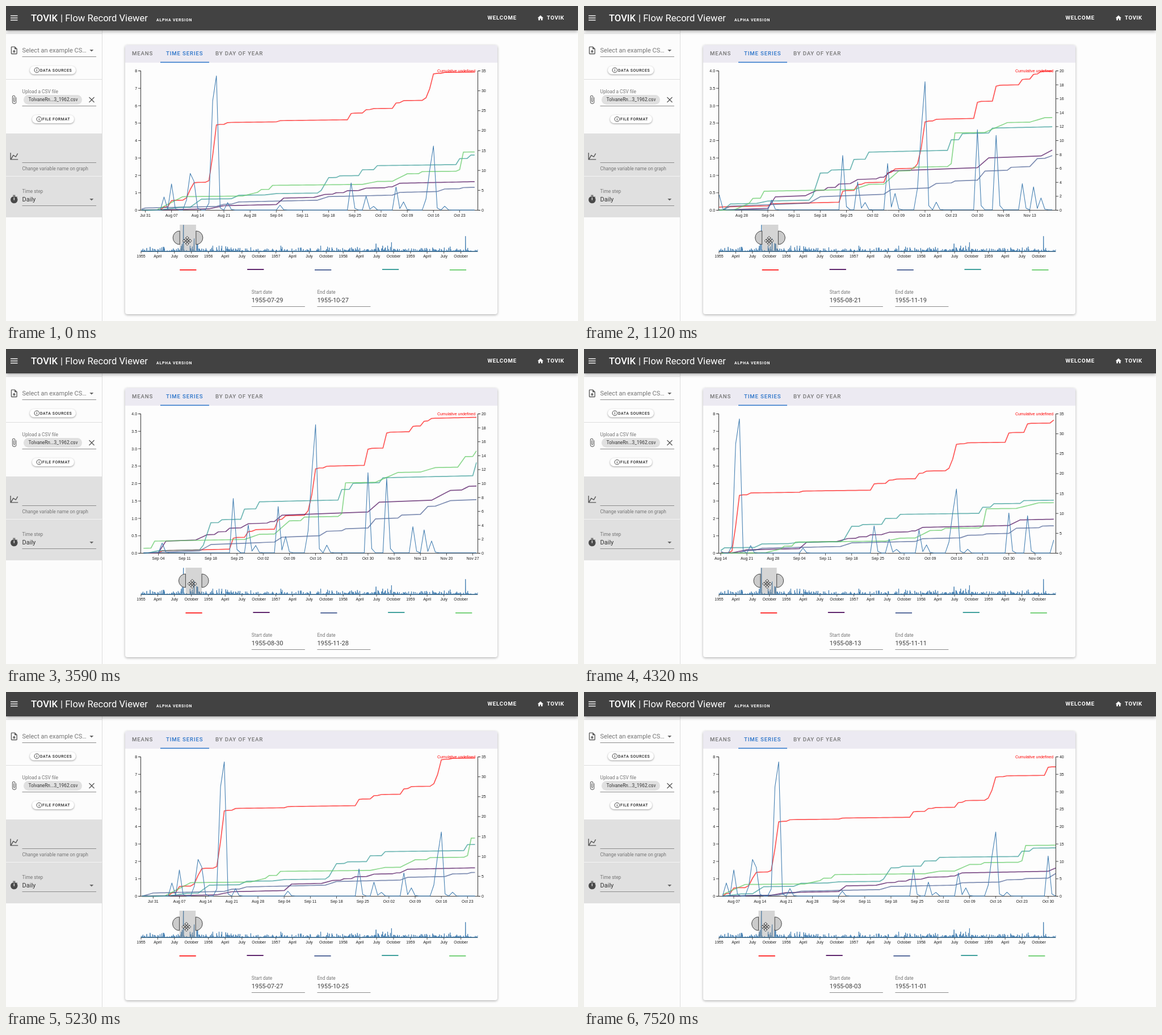
These frames come from a looping animation (1008 by 556 pixels, 8000 ms). An HTML page with a canvas:

```html
<!DOCTYPE html>
<html lang="en">
<head>
<meta charset="utf-8">
<title>Rainfall chart</title>
<style>
html, body { margin: 0; width: 100%; height: 100%; overflow: hidden; background: #fdfdfd; }
canvas { display: block; width: 1008px; height: 556px; }
</style>
</head>
<body>
<canvas id="stage"></canvas>
<script>
const W = 1008, H = 556, LOOP = 8000;
const canvas = document.getElementById('stage');
const ctx = canvas.getContext('2d');
const dpr = window.devicePixelRatio || 1;
canvas.width = W * dpr;
canvas.height = H * dpr;

const ROBOTO = 'Roboto, sans-serif';
const ARIAL = '"Liberation Sans", Arial, sans-serif';
const GREY = '#757575', DARK = '#3c3c3c', BLUE = '#3f7cb0';
const MONTHS = ['Jan', 'Feb', 'Mar', 'Apr', 'May', 'Jun', 'Jul', 'Aug', 'Sep', 'Oct', 'Nov', 'Dec'];

// Plot geometry; day 0 is 31 July 1955.
const LEFT = 238, RIGHT = 831.5, TOP = 114.5, BASE = 360.5;
const SPAN = 90, PX = (RIGHT - LEFT) / SPAN;
const FIRST = -1.14, STRIDE = 2.1;
const MINI = (RIGHT - LEFT) / 1826, MINI_BASE = 433, JUL31 = 211;

// Storms by day; a little rain lingers the day after each.
const storms = new Map([
  [5, .75], [7, 1.5], [11, .57], [12, 2.1], [13, 1.65], [17, .4], [18, 6.27], [19, 7.7], [22, .43], [36, .28],
  [55, 1.56], [59, .8], [61, .21], [67, 1.33], [69, .47], [75, .63], [76, 2.3], [77, 3.68], [80, .22],
  [91, 2.3], [96, 2.14], [103, .75], [106, .66], [108, .34]
]);
const rainOn = day => .012 + (storms.get(day) ?? Math.min(.12, .06 * (storms.get(day - 1) || 0)));

// A slow creep plus rises given as first day, amount, number of days.
const steps = (creep, rises) => day => rises.reduce(
  (sum, [first, amount, days]) => sum + (day >= first && day < first + days ? amount / days : 0),
  day >= 0 ? creep : 0);

const series = [
  { on: rainOn, color: '#ff1010', alpha: .7 },
  { on: steps(.02, [[18, .7, 4], [36, 1.6, 2], [46, .7, 3], [51, .35, 1], [54, .45, 1], [58, .55, 2],
    [65, .2, 1], [67, .85, 2], [92, 1.35, 3], [109, 1.3, 5], [117, .5, 2]]), color: '#440154', alpha: .68 },
  { on: steps(.021, [[-2, .8, 3], [20, .5, 2], [24, .5, 2], [47, .85, 3], [67, .65, 2], [79, .6, 2],
    [85, .25, 1], [92, 1.25, 2], [100, .4, 1], [106, 1.1, 2], [110, .7, 4]]), color: '#3b528b', alpha: .65 },
  { on: steps(.012, [[5, .6, 5], [13, 2, 3], [24, .85, 2], [33, .3, 3], [47, .65, 1], [48, 3.2, 2], [52, .4, 1],
    [58, 1.45, 1], [62, 1, 1], [84, 1.5, 1], [87, .85, 1], [95, .7, 1], [120, 1.9, 1]]), color: '#21918c', alpha: .65 },
  { on: steps(.01, [[4, 3.3, 7], [27, .9, 4], [31, .7, 1], [34, 1, 1], [59, .7, 4], [67, 1.85, 4], [74, .5, 1],
    [84, .4, 1], [85, 4.4, 1], [94, 1.35, 6], [106, .6, 4], [116, 1.5, 2], [120, .8, 1]]), color: '#5ec962', alpha: .7 }
];

// Five years of rain for the overview strip.
const years = (() => {
  let seed = 41;
  const rand = () => (seed = seed * 16807 % 2147483647) / 2147483647;
  const peaks = new Map([[1274, 2.2], [1358, 2.6], [1759, 4.4]]);
  return Array.from({ length: 1826 }, (_, i) => {
    const wet = rand() < .3, amount = Math.min(1.6, -Math.log(rand() + .001) * .36);
    const day = i - JUL31;
    if (day >= 0 && day <= 110) return rainOn(day);
    return peaks.get(i) || (wet ? amount : 0);
  });
})();

// Drag phases: start, end, steps, final position.
const phases = [
  [-24, 290, 6, 3], [510, 750, 5, 7], [810, 1290, 9, 13], [1340, 1390, 2, 14], [1680, 1770, 2, 15],
  [3590, 4370, 15, 6], [4410, 5110, 11, 0], [5230, 5230, 1, -1],
  [6880, 6940, 2, 0], [7130, 7190, 2, 1], [7430, 7520, 2, 2]
];

// The pointer runs one step ahead of the chart while dragging.
function dragAt(t) {
  const k = phases.filter(p => p[0] <= t).length - 1;
  const [t0, t1, count, to] = phases[k];
  const from = k ? phases[k - 1][3] : 0;
  const gap = (t1 - t0) / (count - 1 || 1) || 1;
  const at = i => from + Math.trunc((to - from) * Math.min(i + 1, count) / count);
  const i = Math.floor((t - t0) / gap + 1e-6);
  return { chart: at(i), pointer: at(i + 1) };
}

function text(str, x, y, size, color, o = {}) {
  ctx.font = `${o.weight || 400} ${size}px ${o.font || ROBOTO}`;
  ctx.letterSpacing = (o.gap || 0) + 'px';
  ctx.textAlign = o.align || 'left';
  ctx.fillStyle = color;
  ctx.fillText(str, x, y + size * .36);
  return x + ctx.measureText(str).width;
}
function rect(x, y, w, h, color) {
  ctx.fillStyle = color;
  ctx.fillRect(x, y, w, h);
}
function line(points, color, width) {
  ctx.beginPath();
  points.forEach(([x, y]) => ctx.lineTo(x, y));
  ctx.strokeStyle = color;
  ctx.lineWidth = width;
  ctx.stroke();
}
function panel(x, y, w, h, r, color, shadow) {
  ctx.save();
  if (shadow) {
    ctx.shadowColor = `rgba(0,0,0,${shadow[0]})`;
    ctx.shadowBlur = shadow[1] * dpr;
    ctx.shadowOffsetY = shadow[2] * dpr;
  }
  ctx.beginPath();
  ctx.roundRect(x, y, w, h, r);
  ctx.fillStyle = color;
  ctx.fill();
  ctx.restore();
}
function icon(path, x, y, size, color) {
  ctx.save();
  ctx.translate(x, y);
  ctx.scale(size / 24, size / 24);
  ctx.fillStyle = color;
  ctx.fill(path);
  ctx.restore();
}

const icons = {
  home: new Path2D('M10 20V14H14V20H19V12H22L12 3L2 12H5V20Z'),
  upload: new Path2D('M14 2L20 8V20A2 2 0 0 1 18 22H6A2 2 0 0 1 4 20V4A2 2 0 0 1 6 2H14M18 20V9H13V4H6V20H18M12 11L16 15H13.5V18H10.5V15H8Z'),
  clip: new Path2D('M16.5 6V17.5A4 4 0 0 1 8.5 17.5V5A2.5 2.5 0 0 1 13.5 5V15.5A1 1 0 0 1 11.5 15.5V6H10V15.5A2.5 2.5 0 0 0 15 15.5V5A4 4 0 0 0 7 5V17.5A5.5 5.5 0 0 0 18 17.5V6Z'),
  chart: new Path2D('M16 11.8L20.2 4.5L22 5.5L16.7 14.5L10.2 10.8L5.5 19H22V21H2V3H4V17.5L9.5 8Z'),
  watch: new Path2D('M15 3H9V1H15V3M19 7.4A9 9 0 1 1 17.6 6L19 4.6L20.4 6L19 7.4M13 14V7H11V14Z'),
  caret: new Path2D('M7 10L12 15L17 10Z')
};

function header() {
  panel(0, -4, W, 47, 0, '#424242', [.35, 6, 2]);
  for (let i = 0; i < 3; i++) rect(8, 16.6 + i * 3.8, 12.5, 1.4, '#fff');
  const end = text('TOVIK', 44, 21, 16.6, '#fff', { weight: 500 });
  text('| Flow Record Viewer', end + 5, 21, 16.6, '#fff');
  text('ALPHA VERSION', 265, 24.5, 6.9, '#fff', { weight: 700, gap: .8 });
  text('WELCOME', 848.5, 21, 9.7, '#fff', { weight: 700, gap: .8 });
  icon(icons.home, 935.7, 15, 12.4, '#fff');
  text('TOVIK', 953, 21, 9.7, '#fff', { weight: 700, gap: .6 });
}

function pill(label, x, y, w) {
  panel(x, y, w, 14.5, 7.2, '#fff', [.38, 3, 1]);
  const cx = x + 12.3, cy = y + 7.2;
  ctx.beginPath();
  ctx.arc(cx, cy, 4.3, 0, 7);
  ctx.strokeStyle = '#333';
  ctx.lineWidth = .9;
  ctx.stroke();
  rect(cx - .5, cy - .6, 1, 2.8, '#333');
  rect(cx - .5, cy - 2.2, 1, 1, '#333');
  text(label, x + 18, cy, 6.9, '#222', { weight: 500, gap: .6 });
}

function field(y) { line([[28.5, y], [159, y]], '#8c8c8c', 1); }

function sidebar() {
  rect(0, 43, 169, H - 43, '#fcfcfc');
  line([[169.5, 43], [169.5, H]], '#dedede', 1);
  line([[0, 48.5], [169, 48.5]], '#e4e4e4', 1);
  line([[0, 129.5], [169, 129.5]], '#dedede', 1);
  rect(0, 225, 169, 148, '#e0e0e0');
  line([[0, 300.5], [169, 300.5]], '#f4f4f4', 1);

  icon(icons.upload, 6, 70, 16.6, '#5c5c5c');
  text('Select an example CS…', 28.5, 78, 11, GREY);
  icon(icons.caret, 142.5, 70, 16.6, '#666');
  field(89.5);
  pill('DATA SOURCES', 42, 106, 81);

  text('Upload a CSV file', 28.5, 151, 8.3, GREY);
  icon(icons.clip, 6, 157, 16.6, '#666');
  panel(31, 157, 103, 17, 8.5, '#e0e0e0');
  text('TolvaneRn...3_1962.csv', 39.5, 165, 8.3, '#333');
  line([[146.5, 161], [155.5, 170]], '#555', 1.3);
  line([[155.5, 161], [146.5, 170]], '#555', 1.3);
  field(176.5);
  pill('FILE FORMAT', 46, 192.5, 74);

  icon(icons.chart, 6, 257, 16.6, '#555');
  field(276.5);
  text('Change variable name on graph', 28.5, 287, 8.3, GREY);
  text('Time step', 28.5, 327, 8.3, GREY);
  text('Daily', 28.5, 341.5, 11, '#333');
  icon(icons.watch, 6, 333, 16.6, '#4a4a4a');
  icon(icons.caret, 142.5, 333, 16.6, '#666');
  field(352.5);
}

function card() {
  panel(210, 69, 656, 475, 4, '#fdfdfd', [.32, 4, 1.2]);
  panel(210, 69, 656, 31, [4, 4, 0, 0], '#eceaf2');
  const tab = { weight: 500, gap: .82 };
  text('MEANS', 222, 84, 9.7, GREY, tab);
  text('TIME SERIES', 282, 84, 9.7, '#2b74c9', tab);
  text('BY DAY OF YEAR', 369, 84, 9.7, GREY, tab);
  rect(272, 98.6, 86, 1.5, '#2b74c9');
}

const dateOf = day => new Date(Date.UTC(1955, 6, 31 + day));

function niceStep(max) {
  const raw = max / 10, p = 10 ** Math.floor(Math.log10(raw)), e = raw / p;
  return p * (e >= 7.07 ? 10 : e >= 3.162 ? 5 : e >= 1.414 ? 2 : 1);
}
function scaleFor(max) {
  const step = niceStep(max), top = Math.ceil(max / step - 1e-9) * step;
  return { step, top, y: v => BASE - v / top * (BASE - TOP) };
}

const tick = (str, x, y, align) => text(str, x, y, 6.95, '#1a1a1a', { font: ARIAL, align });

function valueAxis(scale, x, dir) {
  line([[x + 4.5 * dir, TOP], [x, TOP], [x, BASE], [x + 4.5 * dir, BASE]], '#222', .9);
  const count = Math.round(scale.top / scale.step);
  for (let i = 0; i <= count; i++) {
    const v = i * scale.step, y = scale.y(v);
    line([[x, y], [x + 4.5 * dir, y]], '#222', .8);
    tick(scale.step < 1 ? v.toFixed(1) : String(Math.round(v)), x + 6.5 * dir, y, dir < 0 ? 'right' : 'left');
  }
}

function plot(start) {
  const days = [];
  for (let d = Math.ceil(start); d <= start + SPAN; d++) days.push(d);
  const x = d => LEFT + (d - start) * PX;
  const sums = series.map(s => {
    let sum = 0;
    return days.map(d => sum += s.on(d));
  });
  const left = scaleFor(Math.max(...days.map(rainOn)));
  const right = scaleFor(Math.max(...sums.map(s => s[s.length - 1])));

  valueAxis(left, LEFT - .5, -1);
  valueAxis(right, RIGHT, 1);
  line([[LEFT - .5, BASE], [RIGHT, BASE]], '#222', .9);
  for (const d of days) {
    if (d % 7) continue;
    const date = dateOf(d), label = String(date.getUTCDate()).padStart(2, '0');
    line([[x(d), BASE], [x(d), BASE + 4]], '#222', .8);
    tick(`${MONTHS[date.getUTCMonth()]} ${label}`, x(d), 369, 'center');
  }

  ctx.lineJoin = 'round';
  series.forEach((s, i) => {
    ctx.globalAlpha = s.alpha;
    line(days.map((d, j) => [x(d), right.y(sums[i][j])]), s.color, 1.7);
  });
  ctx.globalAlpha = 1;
  line(days.map(d => [x(d), left.y(rainOn(d))]), BLUE, 1.05);
  text('Cumulative undefined', 827, 114.5, 6.95, '#ff0000', { font: ARIAL, align: 'right' });
}

function overview() {
  ctx.lineJoin = 'bevel';
  line(years.map((v, i) => [LEFT + i * MINI, MINI_BASE - .3 - v * 6]), BLUE, .95);
  line([[LEFT - .5, 433.5], [RIGHT, 433.5]], '#24506f', 1);
  const names = ['', 'April', 'July', 'October'];
  for (let q = 0; q < 20; q++) {
    const year = 1955 + Math.floor(q / 4);
    const day = (Date.UTC(year, q % 4 * 3) - Date.UTC(1955, 0)) / 864e5;
    const x = LEFT + day * MINI;
    line([[x, 433], [x, 437]], '#333', .8);
    tick(names[q % 4] || String(year), x, 441.5, 'center');
  }
}

function handle(x, left) {
  ctx.beginPath();
  ctx.arc(x, 409, 12, -Math.PI / 2, Math.PI / 2, left);
  ctx.closePath();
  ctx.fillStyle = '#cbcbcb';
  ctx.fill();
  ctx.strokeStyle = '#444';
  ctx.lineWidth = 1;
  ctx.stroke();
}

function brush(x) {
  const w = SPAN * MINI;
  rect(x, 386, w - .6, 47, 'rgba(119,119,119,.3)');
  handle(x, true);
  handle(x + w - .6, false);
  series.forEach((s, i) => {
    const sx = x + i * 118.9, y = i % 2 ? 465 : 465.8;
    line([[sx, y], [sx + w, y]], s.color, 1.7);
  });
}

function pointer(x, y) {
  ctx.save();
  ctx.translate(x, y);
  ctx.fillStyle = '#fff';
  ctx.strokeStyle = '#222';
  ctx.lineWidth = .9;
  for (let i = 0; i < 4; i++) {
    ctx.rotate(Math.PI / 2);
    ctx.beginPath();
    [[-1, -2], [-1, -4.6], [-3.2, -4.6], [0, -8], [3.2, -4.6], [1, -4.6], [1, -2]].forEach(p => ctx.lineTo(...p));
    ctx.closePath();
    ctx.fill();
    ctx.stroke();
  }
  ctx.beginPath();
  ctx.arc(0, 0, 1.7, 0, 7);
  ctx.fill();
  ctx.stroke();
  ctx.restore();
}

function dateField(label, day, x) {
  text(label, x, 505, 8.3, GREY);
  text(dateOf(day).toISOString().slice(0, 10), x, 519, 11, DARK);
  line([[x, 530.5], [x + 94, 530.5]], '#8c8c8c', 1);
}

function draw(t) {
  const drag = dragAt(t);
  const startOf = n => FIRST + n * STRIDE;
  const miniX = n => LEFT + (startOf(n) + JUL31) * MINI;
  const start = startOf(drag.chart);

  ctx.setTransform(dpr, 0, 0, dpr, 0, 0);
  rect(0, 0, W, H, '#fdfdfd');
  sidebar();
  header();
  card();
  plot(start);
  overview();
  brush(miniX(drag.chart));
  dateField('Start date', Math.floor(start), 432.8);
  dateField('End date', Math.floor(start + SPAN), 548.4);
  pointer(miniX(drag.pointer) + 12.4, 414.5);
}

const begin = performance.now();
function frame() {
  draw((performance.now() - begin) % LOOP);
  requestAnimationFrame(frame);
}
frame();
</script>
</body>
</html>
```
